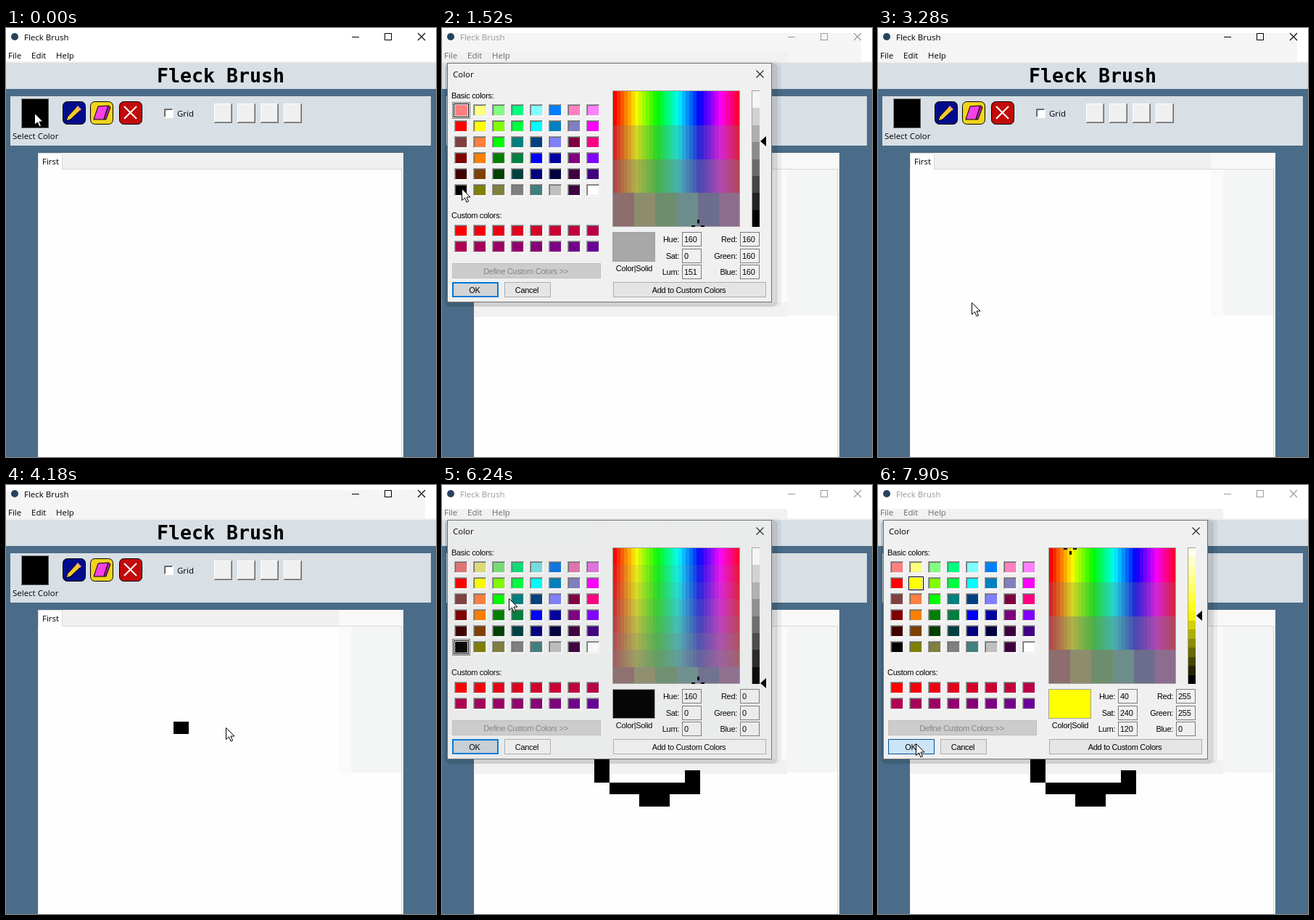
Recreate the animation shown at these times as an HTML page with a canvas. Size 593 by 591 pixels, loop 8 s.

```html
<!DOCTYPE html>
<html lang="en">
<head>
<meta charset="utf-8">
<title>Fleck Brush</title>
<style>
html, body { margin: 0; width: 100%; height: 100%; overflow: hidden; background: #4a6c88; }
canvas { display: block; }
</style>
</head>
<body>
<canvas id="stage" width="593" height="591"></canvas>
<script>
const LOOP = 8000, STEP = LOOP / 60, APP = 'Fleck Brush';
const ctx = document.getElementById('stage').getContext('2d');
const UI = '11.5px "Open Sans", "Noto Sans", sans-serif';
const DIALOG = '11px "Liberation Sans", Arial, sans-serif';
const BIG = 'bold 26.6px "DejaVu Sans Mono", monospace';
const PANEL = '#d8dfe5', FACE = '#f0f0f0';

// System palette in short form: F is FF, any other digit d is d0
const BASIC = ('F88 FF8 8F8 0F8 8FF 08F F8C F8F F00 FF0 8F0 0F4 0FF 08C 88C F0F ' +
  '844 F84 0F0 088 048 88F 804 F08 800 F80 080 084 00F 00A 808 80F ' +
  '400 840 040 044 008 004 404 408 000 880 884 888 488 CCC 404 FFF').split(' ')
  .map(c => '#' + [...c].map(d => d === 'F' ? 'FF' : d + '0').join(''));

// The drawing as column-row pairs in painting order: two eyes, then the mouth
const colX = col => Math.round(210 + col * 20.8);
const rowY = row => Math.round(326 + row * 16.7);
const CELLS = '10 40 03 04 15 25 35 45 55 65 64 46 36'.split(' ').map(([col, row], i) => ({
  at: i < 2 ? 3800 + i * 530 : 4450 + (i - 2) * 96, col: +col, row: +row
}));

// Cursor stops: arrival time, x, y
const STOPS = [
  [130, 39, 117], [260, 189, 260], [1500, 26, 221], [2130, 47, 351], [2850, 47, 367],
  [3190, 129, 378], [3700, 240, 333], [4100, 303, 334],
  ...CELLS.slice(2).map(c => [c.at - 50, colX(c.col + .45), rowY(c.row + .25)]),
  [5860, 48, 129], [6130, 92, 156], [6660, 54, 134], [7460, 52, 356]
];

function rect(x, y, w, h, fill) {
  ctx.fillStyle = fill;
  ctx.fillRect(x, y, w, h);
}

function box(x, y, w, h, fill, edge, line = 1) {
  rect(x, y, w, h, edge);
  rect(x + line, y + line, w - 2 * line, h - 2 * line, fill);
}

function bevel(x, y, w, h, fill, light, dark) {
  rect(x, y, w, h, dark);
  rect(x, y, w - 1, h - 1, light);
  rect(x + 1, y + 1, w - 2, h - 2, fill);
}

function text(str, x, y, font = UI, color = '#000', align = 'left') {
  ctx.font = font;
  ctx.letterSpacing = font === DIALOG ? '-0.3px' : '0px';
  ctx.textAlign = align;
  ctx.fillStyle = color;
  ctx.fillText(str, x, y);
}

function shape(points, fill, stroke, width = 1, closed = true) {
  ctx.beginPath();
  for (const [x, y] of points) ctx.lineTo(x, y);
  if (closed) ctx.closePath();
  if (fill) { ctx.fillStyle = fill; ctx.fill(); }
  if (stroke) { ctx.strokeStyle = stroke; ctx.lineWidth = width; ctx.stroke(); }
}

function rounded(x, y, w, h, r, fill, stroke) {
  ctx.beginPath();
  ctx.roundRect(x, y, w, h, r);
  ctx.fillStyle = fill;
  ctx.fill();
  if (stroke) { ctx.strokeStyle = stroke; ctx.lineWidth = 1; ctx.stroke(); }
}

function cross(x, y, size, color, width) {
  shape([[x, y], [x + size, y + size]], null, color, width, false);
  shape([[x + size, y], [x, y + size]], null, color, width, false);
}

function titleBar(t, open, dim) {
  const ink = dim ? '#999' : '#000', menu = dim ? '#6d6d6d' : '#000';
  rect(0, 0, 593, 48, '#fff');
  if (t >= 270 && t < 5820) rect(0, 7, 578, 39, '#f5f5f5');
  if (open) rect(0, 33, 476, 13, '#f1f1f1');
  rect(0, 46, 593, 2, FACE);
  rounded(7, 7, 10, 10, 5, '#27425c');
  text(APP, 25, 17, UI, ink);
  text('File', 3, 42, UI, menu);
  text('Edit', 35, 42, UI, menu);
  text('Help', 69, 42, UI, menu);
  rect(477, 12, 10, 1, ink);
  ctx.strokeStyle = ink;
  ctx.lineWidth = 1;
  ctx.strokeRect(522.5, 7.5, 9, 9);
  cross(568, 7, 10, ink, 1.1);
}

function toolbar() {
  rect(0, 48, 593, 36, PANEL);
  text(APP, 296, 75, BIG, '#000', 'center');
  rect(6, 94, 580, 68, PANEL);
  bevel(21, 97, 38, 41, '#000', '#8a8a8a', '#555');
  text('Select Color', 9, 153);

  rounded(78.5, 101.5, 31, 31, 6, '#000c8c', '#000');
  shape([[83, 128], [85, 122], [99, 107], [104, 112], [89, 126]], '#f6c930', '#000');
  shape([[97, 109], [99, 107], [104, 112], [102, 114]], '#e9a0a0');
  rounded(116.5, 101.5, 31, 31, 6, '#f0d31c', '#000');
  shape([[121, 126], [127, 108], [141, 107], [135, 126]], '#f341e6', '#000');
  shape([[135, 126], [141, 107], [144, 109], [138, 126]], '#b81ead', '#000');
  rounded(156.5, 101.5, 31, 31, 6, '#c20a0a', '#000');
  cross(163, 108, 17, '#fff', 2.2);

  bevel(218, 111, 13, 13, '#fff', '#808080', '#fff');
  bevel(219, 112, 11, 11, '#fff', '#555', '#fff');
  text('Grid', 236, 122);
  for (let x = 287; x < 400; x += 32) {
    bevel(x, 104, 25, 27, '#a0a0a0', '#fff', '#696969');
    rect(x + 1, 105, 22, 24, FACE);
  }
}

function canvasTab(t, open) {
  rect(44, 172, 504, 419, FACE);
  if (t >= 270) rect(459, 172, 89, 22, '#f8f8f8');
  rect(45, 194, 501, 397, '#d9d9d9');
  rect(45, 195, 500, 396, '#fefefe');
  box(44, 172, 34, 23, '#fefefe', '#d9d9d9');
  rect(45, 193, 32, 3, '#fefefe');
  text('First', 50, 188);
  if (t >= 270) {
    rect(459, 195, 17, 202, '#fafafa');
    rect(476, 195, 69, 201, '#f4f5f5');
  }
  if (open) rect(45, 378, 431, 20, '#f1f1f1');
  for (const { at, col, row } of CELLS) {
    const x = colX(col), y = rowY(row);
    if (t >= at) rect(x, y, colX(col + 1) - x, rowY(row + 1) - y, '#000');
  }
}

// Hue runs across, saturation falls in bands
function spectrum(faded) {
  const rows = faded ? 8 : 4, h = 187 / rows;
  for (let row = 0; row < rows; row++) {
    const columns = row === rows - 1 ? 6 : 35, w = 175 / columns;
    const y = Math.round(87 + row * h), bottom = Math.round(87 + (row + 1) * h);
    for (let i = 0; i < columns; i++) {
      const x = Math.round(236 + i * w);
      rect(x, y, Math.round(236 + (i + 1) * w) - x, bottom - y,
        `hsl(${i / columns * 360} ${100 - 87 * row / (rows - 1)}% 49%)`);
    }
  }
  ctx.strokeStyle = '#a0a0a0';
  ctx.lineWidth = 1;
  ctx.strokeRect(235.5, 86.5, 175, 187);
}

function marker(hue, sat) {
  const x = Math.round(236 + hue / 240 * 175), y = Math.round(273 - sat / 240 * 186);
  ctx.save();
  ctx.beginPath();
  ctx.rect(236, 87, 175, 187);
  ctx.clip();
  for (const d of [-9, 4]) {
    rect(x + d, y - 1, 5, 3, '#000');
    rect(x - 1, y + d, 3, 5, '#000');
  }
  ctx.restore();
}

function luminance(hue, sat, lum) {
  const bands = sat ? 15 : 8, h = 187 / bands;
  box(427, 86, 11, 188, '#fff', '#a0a0a0');
  for (let i = 0; i < bands; i++) {
    const y = Math.round(87 + i * h);
    rect(428, y, 10, Math.round(87 + (i + 1) * h) - y,
      `hsl(${hue * 1.5} ${sat / 2.4}% ${96 * (1 - i / (bands - 1))}%)`);
  }
  const y = 273 - lum / 240 * 186;
  shape([[439, y], [447, y - 7], [447, y + 7]], '#000');
}

function swatch(x, y, color) {
  bevel(x, y, 19, 17, color, '#a0a0a0', '#fff');
  bevel(x + 1, y + 1, 17, 15, color, '#696969', '#e3e3e3');
}

function swatches(faded, selected, focused) {
  text('Basic colors:', 13, 97, DIALOG);
  BASIC.forEach((color, i) => {
    const x = 17 + i % 8 * 26, y = 105 + (i >> 3) * 22;
    if (i === selected) {
      box(x - 1, y - 1, 21, 19, '#fff', '#000');
      rect(x + 1, y + 1, 17, 15, color);
      if (focused) {
        ctx.setLineDash([1, 1]);
        ctx.strokeStyle = '#000';
        ctx.lineWidth = 1;
        ctx.strokeRect(x - 2.5, y - 2.5, 24, 22);
        ctx.setLineDash([]);
      }
    } else swatch(x, y, color);
    if (faded && i < 8) rect(x + 2, y + 2, 15, 13, 'rgba(90,70,80,.18)');
  });
  text('Custom colors:', 13, 262, DIALOG);
  for (let i = 0; i < 16; i++)
    swatch(17 + i % 8 * 26, 271 + (i >> 3) * 22, `rgb(${255 - 10 * i} 0 ${10 * i})`);
}

function button(label, x, y, w, fill = '#e5e5e5', edge = '#adadad', line = 1, ink = '#000') {
  box(x, y, w, 21, fill, edge, line);
  text(label, x + w / 2 - 1, y + 15, DIALOG, ink, 'center');
}

function dialog(t, closing) {
  const faded = t < 420 || t >= 6120 && t < 6360;
  const yellow = t >= 6880, black = t >= 1650 && !yellow;
  const pressed = t >= 2760 && t < 3130 || t >= 7900;
  const hover = t >= 2150 && t < 3130 || t >= 7530;
  const face = closing ? '#f6f6f6' : FACE;
  const [hue, sat, lum, rgb] = yellow ? [40, 240, 120, [255, 255, 0]]
    : black ? [160, 0, 0, [0, 0, 0]] : [160, 0, 151, [160, 160, 160]];

  rounded(4, 46, 464, 338, 8, 'rgba(0,0,0,.05)');
  rounded(4, 48, 459, 336, 8, 'rgba(0,0,0,.09)');
  ctx.globalAlpha = faded ? .96 : 1;
  box(7, 48, 448, 330, face, '#6e7275');
  text('Color', 15, 68);
  if (!closing) cross(433.5, 58.5, 10, '#222', 1.1);
  swatches(faded, yellow ? 9 : black ? 40 : 0, !pressed);
  spectrum(faded);
  marker(hue, sat);
  luminance(hue, sat, lum);

  box(235, 281, 59, 41, black || yellow ? `rgb(${rgb})` : '#a8a8a8', '#a0a0a0');
  text('Color|Solid', 265, 335, DIALOG, '#000', 'center');
  ['Hue:', 'Sat:', 'Lum:', 'Red:', 'Green:', 'Blue:'].forEach((label, i) => {
    const x = i < 3 ? 331 : 411, y = 281 + Math.round(i % 3 * 22.5);
    text(label, x - 4, y + 14, DIALOG, '#000', 'right');
    box(x, y, 27, 20, face, '#7a7a7a');
    text([hue, sat, lum, ...rgb][i], x + 3, y + 14, DIALOG);
  });

  const soft = faded ? '#efefef' : '#e5e5e5';
  button('Define Custom Colors >>', 14, 324, 205, '#ccc', '#bfbfbf', 1, '#838383');
  if (pressed) button('OK', 14, 350, 64, closing ? '#d8e3ec' : '#cce4f7', '#005499');
  else button('OK', 14, 350, 64, hover ? '#e5f1fb' : '#d2d4d6', '#0078d7', hover ? 1 : 2);
  button('Cancel', 86, 350, 64, soft);
  button('Add to Custom Colors', 236, 350, 211, soft);
  ctx.globalAlpha = 1;
}

// Rests for a quarter of each leg, then eases to the next stop
function cursor(t) {
  const s = Math.floor(t / STEP) * STEP;
  const i = Math.max(0, STOPS.findLastIndex(p => p[0] <= s));
  const a = STOPS[i], b = STOPS[i + 1] || [LOOP * 2, a[1], a[2]];
  const u = Math.max(0, ((s - a[0]) / (b[0] - a[0]) - .25) / .75);
  const k = u * u * (3 - 2 * u);
  const x = Math.round(a[1] + (b[1] - a[1]) * k) + .5;
  const y = Math.round(a[2] + (b[2] - a[2]) * k) + .5;
  const arrow = [[0, 0], [0, 16], [4, 12.5], [6.5, 18.5], [9, 17.5], [6.5, 11.5], [11.5, 11.5]];
  shape(arrow.map(([dx, dy]) => [x + dx, y + dy]), '#fff', '#000');
}

function draw(t) {
  const open = t >= 270 && t < 3130 || t >= 6120;
  const dim = t >= 150 && t < 2890 || t >= 5970;
  rect(0, 0, 593, 591, '#4a6c88');
  titleBar(t, open, dim);
  toolbar();
  canvasTab(t, open);
  if (open) dialog(t, t >= 2890 && t < 3130);
  cursor(t);
}

const start = performance.now();
function tick() {
  draw((performance.now() - start) % LOOP);
  requestAnimationFrame(tick);
}
tick();
</script>
</body>
</html>
```
